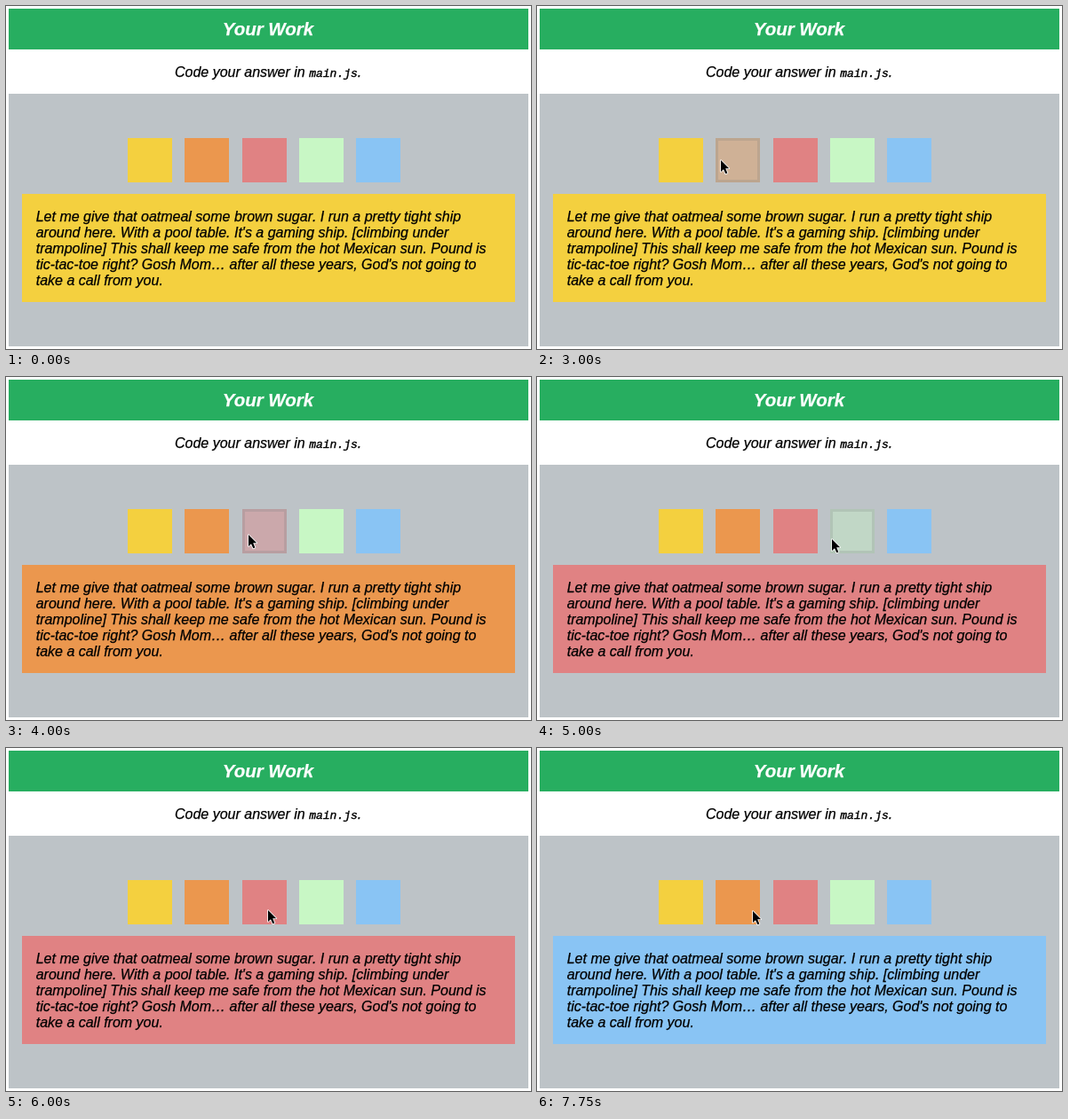
These frames come from a looping animation (591 by 387 pixels, 8 s). An HTML page:

```html
<!DOCTYPE html>
<html lang="en">
<head>
<meta charset="utf-8">
<title>Your Work</title>
<style>
  html, body { margin: 0; width: 100%; height: 100%; overflow: hidden; background: #fff; }
  svg { display: block; width: 591px; height: 387px; }
  text {
    font: italic 16px "Liberation Sans", Arial, sans-serif;
    font-kerning: none; stroke: #000; stroke-width: 0.25px;
  }
  .title {
    font-size: 20.5px; font-weight: bold; font-kerning: normal;
    fill: #fff; stroke: #fff;
  }
  .code { font: italic 13px "Liberation Mono", "Courier New", monospace; stroke-width: 0.4px; }
</style>
</head>
<body>
<svg viewBox="0 0 591 387">
  <rect x="3" y="3" width="585" height="46" fill="#27ae60"/>
  <text class="title" x="295" y="33" text-anchor="middle">Your Work</text>
  <text x="190" y="80">Code your answer in <tspan class="code">main.js</tspan>.</text>
  <rect x="3" y="99" width="585" height="285" fill="#bdc3c7"/>
  <g id="swatches"></g>
  <rect id="panel" x="18" y="212" width="555" height="122"/>
  <g id="quote"></g>
  <path id="cursor" d="M0 1V14L3 11.2L5.3 16.3L7.4 15.4L5.2 10.3H9.2Z"
    stroke="#fff" stroke-width="1.6" paint-order="stroke" stroke-linejoin="round"/>
</svg>
<script>
const COLORS = ['#f4d03f', '#eb974e', '#e08283', '#c8f7c5', '#89c4f4'];
const LINES = [
  'Let me give that oatmeal some brown sugar. I run a pretty tight ship',
  "around here. With a pool table. It's a gaming ship. [climbing under",
  'trampoline] This shall keep me safe from the hot Mexican sun. Pound is',
  "tic-tac-toe right? Gosh Mom… after all these years, God's not going to",
  'take a call from you.'
];
const LOOP = 8000, TICK = 250, SIZE = 50, TOP = 149;
const FAST = 40; // pixels per tick above which no hover registers

// Pointer stops: time, x, y.
const STOPS = [
  [500, 264, 83], [1500, 184, 159], [2000, 197, 152], [2750, 198, 169],
  [3000, 207, 173], [3500, 207, 173], [4000, 273, 177], [4500, 273, 177],
  [5000, 332, 182], [5250, 345, 181], [6000, 295, 182], [6750, 412, 178],
  [7000, 412, 178], [7750, 243, 183]
];
const CLICKS = [3250, 4250, 5250, 6000, 7000];

const byId = id => document.getElementById(id);
const left = i => Math.round(137 + 64.25 * i);
const ease = k => k * k * (3 - 2 * k);

function add(parent, name, attrs) {
  const el = document.createElementNS('http://www.w3.org/2000/svg', name);
  for (const key in attrs) el.setAttribute(key, attrs[key]);
  return parent.appendChild(el);
}

function pointer(t) {
  if (t < STOPS[0][0]) return null;
  const next = STOPS.findIndex(stop => stop[0] > t);
  if (next < 0) return STOPS[STOPS.length - 1].slice(1);
  const [t0, x0, y0] = STOPS[next - 1], [t1, x1, y1] = STOPS[next];
  const k = ease((t - t0) / (t1 - t0));
  return [x0 + (x1 - x0) * k, y0 + (y1 - y0) * k];
}

function swatchAt(point) {
  if (!point || point[1] < TOP || point[1] > TOP + SIZE) return -1;
  return COLORS.findIndex((_, i) => point[0] >= left(i) && point[0] <= left(i) + SIZE);
}

function selectedAt(t) {
  const click = CLICKS.filter(time => time <= t).pop();
  return click ? swatchAt(pointer(click)) : 0;
}

function hoverAt(t) {
  const now = pointer(t), before = pointer(t - TICK);
  if (!now || !before || Math.abs(now[0] - before[0]) > FAST) return -1;
  return swatchAt(now);
}

const swatches = COLORS.map((fill, i) => {
  const group = add(byId('swatches'), 'g', {});
  add(group, 'rect', { x: left(i), y: TOP, width: SIZE, height: SIZE, fill });
  const border = add(group, 'rect', {
    x: left(i) + 1.5, y: TOP + 1.5, width: SIZE - 3, height: SIZE - 3,
    fill: 'none', stroke: '#000', 'stroke-opacity': 0.2, 'stroke-width': 3
  });
  return { group, border };
});
LINES.forEach((line, i) => {
  add(byId('quote'), 'text', { x: 33.7, y: 243 + 18 * i }).textContent = line;
});

function draw(time) {
  const t = Math.floor(time / TICK) * TICK;
  const selected = selectedAt(t), hover = hoverAt(t), tip = pointer(t);
  swatches.forEach(({ group, border }, i) => {
    const lit = i === hover && i !== selected;
    group.setAttribute('opacity', lit ? 0.4 : 1);
    border.setAttribute('visibility', lit ? 'visible' : 'hidden');
  });
  byId('panel').setAttribute('fill', COLORS[selected]);

  const cursor = byId('cursor');
  cursor.setAttribute('visibility', tip ? 'visible' : 'hidden');
  if (tip) cursor.setAttribute('transform', `translate(${tip.map(Math.round)})`);
}

const begin = performance.now();
function frame() {
  draw((performance.now() - begin) % LOOP);
  requestAnimationFrame(frame);
}
draw(0);
requestAnimationFrame(frame);
</script>
</body>
</html>
```
